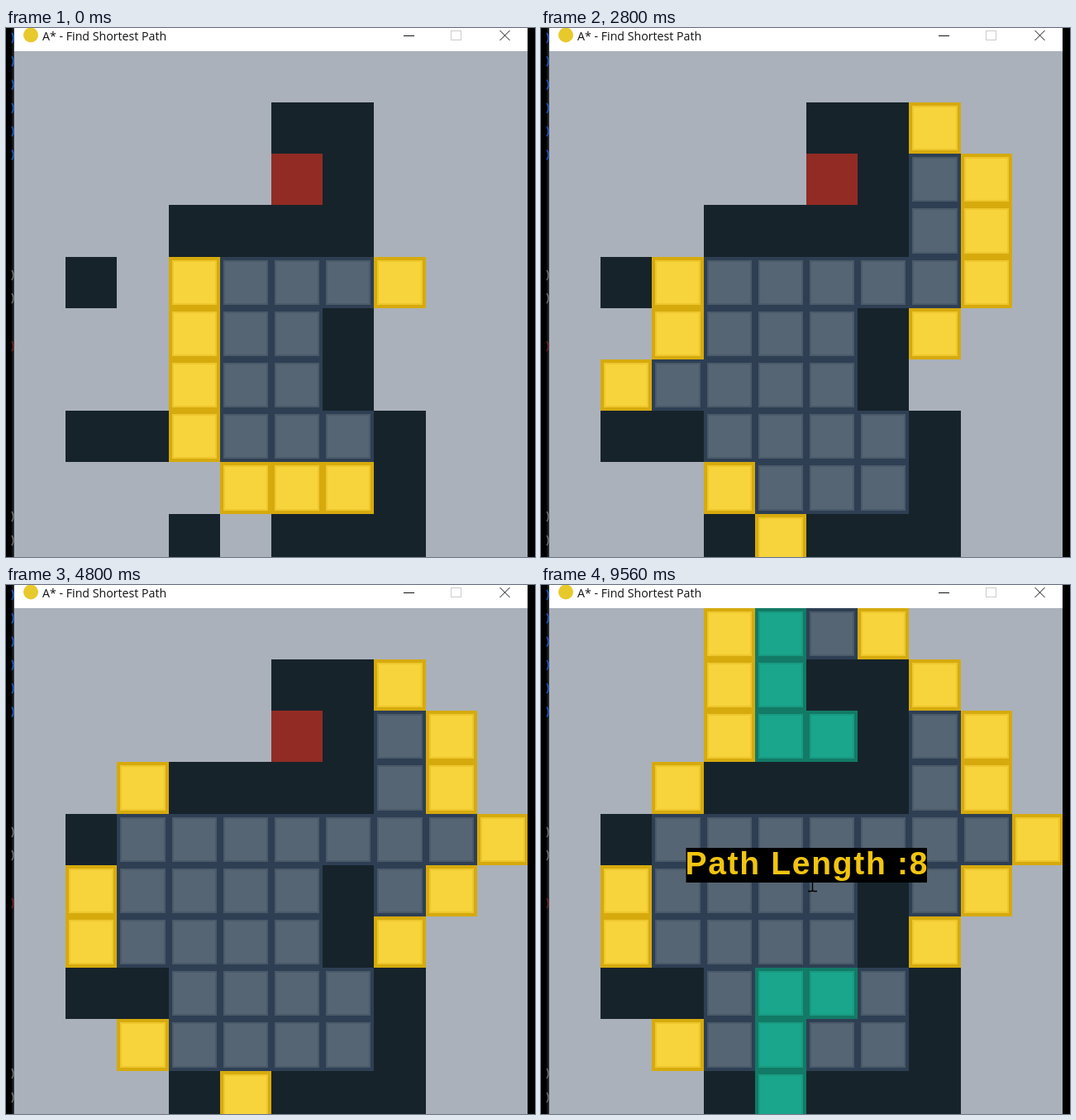
An HTML page for the animation above (9.6 s loop, 640 by 640 pixels).

```html
<!DOCTYPE html>
<html lang="en">
<head>
<meta charset="utf-8">
<title>A* - Find Shortest Path</title>
<style>
  html, body { margin: 0; width: 100%; height: 100%; overflow: hidden; background: #000; }
  svg { display: block; width: 640px; height: 640px; }
  .cell { display: none; }
  .wall, .goal, .open, .closed, .path { display: inline; }
  .wall { --edge: #17232b; --rim: #17232b; --fill: #17232b; }
  .goal { --edge: #922b24; --rim: #922b24; --fill: #922b24; }
  .open { --edge: #d6aa0d; --rim: #eec62d; --fill: #f7d33c; }
  .closed { --edge: #2e3f54; --rim: #4a5a69; --fill: #566573; }
  .path { --edge: #127a66; --rim: #189a82; --fill: #1aa68c; }
  .cell :nth-child(1) { fill: var(--edge); }
  .cell :nth-child(2) { fill: var(--rim); }
  .cell :nth-child(3) { fill: var(--fill); }
  .title { font: 14.2px "Open Sans", "Noto Sans", sans-serif; fill: #111; }
  .result { font: bold 39px "Liberation Sans", Arial, sans-serif; letter-spacing: 1.7px; fill: #f1c40f; }
  .line { fill: none; stroke: #111; }
</style>
</head>
<body>
<svg viewBox="0 0 640 640" xmlns="http://www.w3.org/2000/svg">
  <rect width="640" height="640" fill="#000"/>
  <rect x="7" width="3" height="640" fill="#14171b"/>
  <rect x="9" width="1" height="640" fill="#3c4147"/>
  <g id="marks" fill="none" stroke-width="1.4"></g>

  <rect x="10" y="28" width="621" height="612" fill="#aab1bb"/>
  <g id="grid"></g>

  <rect x="10" width="621" height="28" fill="#fff"/>
  <circle cx="30" cy="8.5" r="9" fill="#e8c92c"/>
  <text class="title" x="44" y="15">A* - Find Shortest Path</text>
  <path class="line" d="M481 9.5H494M597.5 3L609.5 15M609.5 3L597.5 15"/>
  <rect class="line" x="538.5" y="3.5" width="12" height="11" style="stroke:#ccc"/>
  <rect x="631" width="9" height="640" fill="#000"/>

  <g id="result">
    <rect x="175.5" y="318" width="291.5" height="42" fill="#000"/>
    <text class="result" x="174.5" y="350">Path Length :8</text>
  </g>
  <path id="cursor" class="line" style="stroke:#000" stroke-width="1.4"
    d="M-5.5 -10H-2Q0 -10 0 -8Q0 -10 2 -10H5.5M0 -8V8M-5.5 10H-2Q0 10 0 8Q0 10 2 10H5.5"/>
</svg>
<script>
const LOOP = 9600, SIZE = 62.2, RESULT_AT = 7800;
const $ = id => document.getElementById(id);

// Cells are written as column and row digits.
const steps = [
  { at: 0, wall: "51 61 62 33 43 53 63 14 65 66 17 27 77 78 39 59 69 79", goal: "52",
    open: "34 35 36 37 74 48 58 68", closed: "44 54 64 45 55 46 56 47 57 67" },
  { at: 800, open: "73 24 84 25 75 26 38", closed: "34 35 36 37 74 58" },
  { at: 1800, open: "72 83 49", closed: "73 48 68" },
  { at: 2800, open: "71 82 16", closed: "72 26" },
  { at: 3800, open: "15 28", closed: "25 38" },
  { at: 4800, open: "23 94 85 76", closed: "24 84 75" },
  { at: RESULT_AT, open: "30 31 32 60", closed: "50", path: "40 41 42 52 47 57 48 49" }
];

// Pointer moves: start, last change, number of changes, from, to, easing.
const easeOut = k => 1 - (1 - k) ** 2;
const easeInOut = k => k * k * (3 - 2 * k);
const moves = [
  [8100, 8180, 3, [637, 8], [628.5, 16], easeOut],
  [8220, 8260, 2, [628.5, 16], [638, 24], easeInOut],
  [8730, 8960, 8, [638, 8], [181.5, 243], easeOut],
  [9160, 9560, 13, [181.5, 243], [328.5, 360.5], easeInOut]
];

function add(parent, tag, attrs) {
  const node = document.createElementNS("http://www.w3.org/2000/svg", tag);
  for (const name in attrs) node.setAttribute(name, attrs[name]);
  return parent.appendChild(node);
}

const cells = {};
for (let row = 0; row < 10; row++) {
  for (let col = 0; col < 10; col++) {
    const edge = (origin, i) => Math.round(origin + SIZE * i);
    const x = edge(10, col), y = edge(27.8, row);
    const w = edge(10, col + 1) - x, h = edge(27.8, row + 1) - y;
    const cell = cells[`${col}${row}`] = add($("grid"), "g", { class: "cell" });
    for (const d of [0, 4, 6]) {
      add(cell, "rect", { x: x + d, y: y + d, width: w - 2 * d, height: h - 2 * d });
    }
  }
}

function mark(y, stroke) {
  add($("marks"), "path", { d: `M7 ${y - 6}Q11 ${y} 7 ${y + 6}`, stroke });
}
for (let i = 0; i < 6; i++) mark(12 + i * 28.3, "#1d62d8");
for (const y of [299, 327, 591, 620]) mark(y, "#777");
mark(385, "#7a2525");

let shown = -1;
function showStep(index) {
  if (index === shown) return;
  shown = index;
  const state = {};
  for (const { at, ...groups } of steps.slice(0, index + 1)) {
    for (const kind in groups) {
      for (const id of groups[kind].split(" ")) state[id] = kind;
    }
  }
  for (const id in cells) cells[id].setAttribute("class", `cell ${state[id] || ""}`);
}

function pointerAt(t) {
  const move = moves.filter(m => m[0] <= t).pop();
  if (!move) return [660, 0];
  const [start, end, count, from, to, ease] = move;
  const gap = (end - start) / (count - 1);
  const tick = Math.min(count, Math.floor((t - start) / gap + 0.01) + 1);
  const k = ease(tick / count);
  return from.map((v, i) => v + (to[i] - v) * k);
}

function render(t) {
  showStep(steps.filter(s => s.at <= t).length - 1);
  $("result").style.display = t >= RESULT_AT ? "" : "none";
  $("cursor").setAttribute("transform", `translate(${pointerAt(t).join(" ")})`);
}

const began = performance.now();
function loop() {
  render((performance.now() - began) % LOOP);
  requestAnimationFrame(loop);
}
loop();
</script>
</body>
</html>
```
